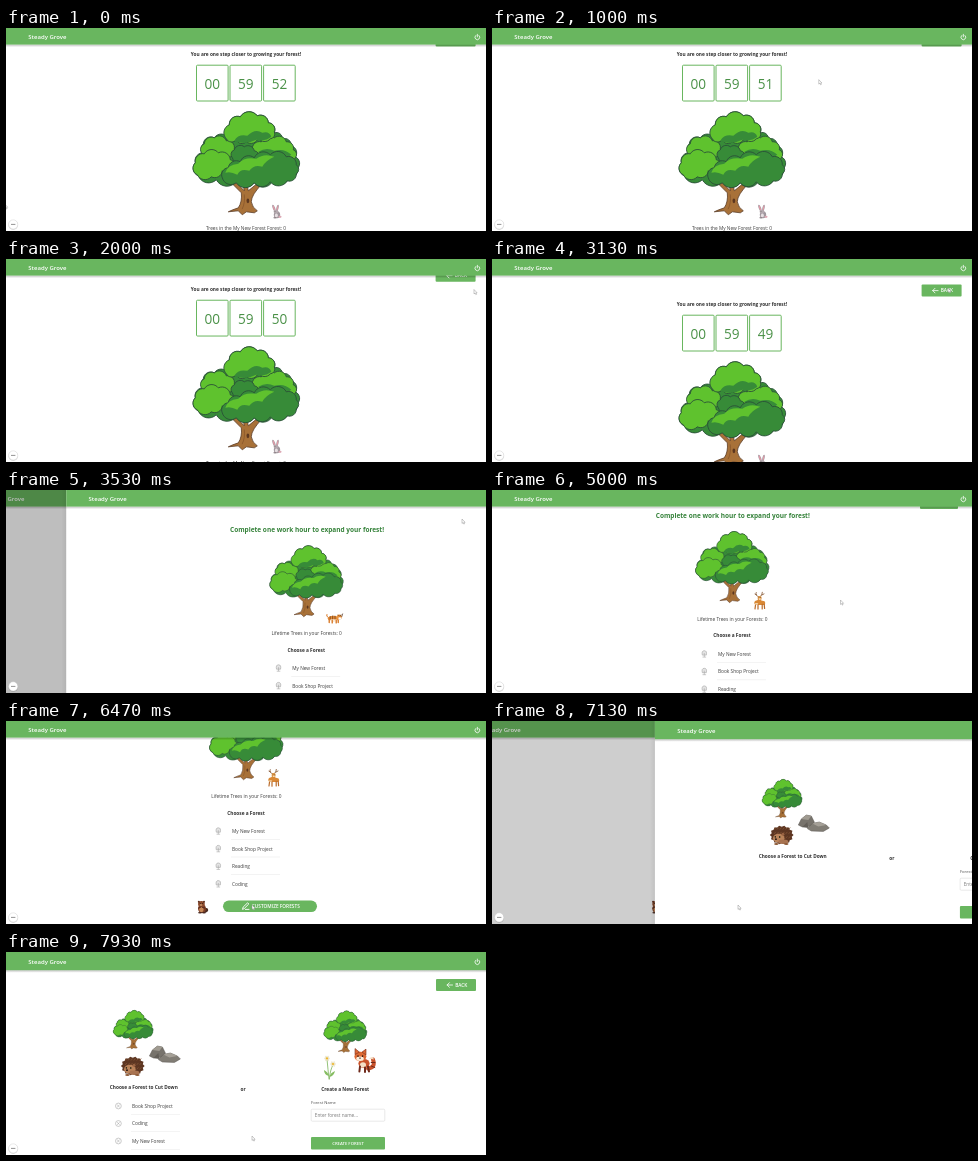
An HTML page that plays this animation: 480x203 px, repeating every 8 s.

```html
<!DOCTYPE html>
<html lang="en">
<head>
<meta charset="utf-8">
<title>Steady Grove</title>
<style>
  html, body { margin: 0; width: 100%; height: 100%; overflow: hidden; background: #fff; }
  svg { display: block; width: 100vw; height: 100vh; }
  text { font-family: "Open Sans", "Noto Sans", sans-serif; font-size: 4.78px; fill: #3c3c3c; }
  .b { font-weight: 700; fill: #303030; }
  .w { font-weight: 600; fill: #fff; }
  .m { text-anchor: middle; }
</style>
</head>
<body>
<svg id="stage" viewBox="0 0 480 203" preserveAspectRatio="none"></svg>
<script>
const GREEN = '#69b65f', INK = '#2b5138', LIGHT = '#5fc22e', DARK = '#378b38';
const APP = 'Steady Grove';

// ---- drawing helpers ----
const text = (x, y, s, cls = '', extra = '') => `<text x="${x}" y="${y}" class="${cls}" ${extra}>${s}</text>`;
const rect = (x, y, w, h, fill, extra = '') => `<rect x="${x}" y="${y}" width="${w}" height="${h}" fill="${fill}" ${extra}/>`;
const path = (d, fill = 'none', extra = '') => `<path d="${d}" fill="${fill}" ${extra}/>`;
const oval = (x, y, rx, ry, fill, extra = '') => `<ellipse cx="${x}" cy="${y}" rx="${rx}" ry="${ry}" fill="${fill}" ${extra}/>`;
const line = (d, color, width) => path(d, 'none', `stroke="${color}" stroke-width="${width}" stroke-linecap="round" stroke-linejoin="round"`);
const at = (x, y, scale, body) => `<g transform="translate(${x} ${y}) scale(${scale})">${body}</g>`;

// Closed outline of outward bumps through the given points (clockwise).
function cloud(fill, ...pts) {
  let d = `M${pts[0]}`;
  pts.forEach((p, i) => {
    const q = pts[(i + 1) % pts.length];
    const r = Math.hypot(q[0] - p[0], q[1] - p[1]) * 0.6;
    d += `A${r} ${r} 0 0 1 ${q}`;
  });
  return path(d + 'Z', fill, `stroke="${INK}" stroke-width="0.9" stroke-linejoin="round"`);
}

const tree =
  path('M36 69L49 82Q50 91 46 97Q40 99 36 101L46 100L50 104L54 101L62 102L65 100Q60 97 59 91Q59 84 70 73L67 71L56 80L54 70L50 70L52 80L40 68Z',
    '#a87138', 'stroke="#5b3d28" stroke-width="0.8" stroke-linejoin="round"') +
  oval(55.6, 90, 1.4, 2.4, '#5d371f') +
  line('M52 84Q53 92 50 98', '#855229', 0.7) +
  cloud(DARK, [6, 65], [3, 52], [12, 42], [11, 33], [22, 27], [36, 27], [37, 14], [48, 6], [65, 5], [76, 12],
    [82, 22], [90, 28], [99, 35], [103, 46], [105, 58], [97, 67], [80, 71], [62, 72], [44, 71], [24, 69]) +
  cloud(LIGHT, [60, 39], [69, 31], [82, 27], [94, 31], [101, 39], [103, 47], [90, 49], [76, 45]) +
  path('M66 41Q74 36 82 40Q92 37 99 44Q92 50 84 46Q74 48 66 41Z', DARK) +
  cloud(LIGHT, [10, 43], [12, 33], [22, 27], [34, 30], [42, 38], [38, 46], [24, 47]) +
  cloud(DARK, [40, 47], [42, 39], [52, 36], [62, 40], [66, 47], [54, 51]) +
  cloud(LIGHT, [34, 28], [37, 14], [48, 6], [65, 5], [76, 12], [82, 21], [78, 28], [66, 27], [54, 31], [44, 29]) +
  path('M42 30Q46 23 55 25Q63 17 70 22Q77 20 79 26Q73 31 64 29Q52 35 42 30Z', DARK) +
  cloud(LIGHT, [5, 64], [3, 52], [12, 43], [26, 42], [38, 49], [42, 59], [30, 60], [19, 66]) +
  cloud(DARK, [30, 67], [36, 57], [48, 51], [62, 47], [78, 44], [94, 46], [104, 54], [104, 63], [95, 70], [78, 71], [62, 72], [44, 72]) +
  path('M33 62Q35 54 46 53Q52 46 64 48Q72 42 82 46Q73 50 70 56Q62 53 57 60Q48 57 45 64Q38 60 33 62Z', LIGHT);

const rabbit =
  oval(3, 3.8, 1.2, 3.7, '#a89ba2', 'transform="rotate(-20 3 4)"') +
  oval(3, 3.8, 0.6, 2.8, '#e79aa8', 'transform="rotate(-20 3 4)"') +
  oval(6.4, 3.6, 1.1, 3.5, '#a89ba2', 'transform="rotate(12 6 4)"') +
  oval(6.4, 3.6, 0.5, 2.7, '#e79aa8', 'transform="rotate(12 6 4)"') +
  oval(6, 10.4, 3.2, 3.5, '#a0979d') + oval(5, 7.4, 2.4, 2, '#b3a8ae') +
  oval(5.4, 11, 1.5, 2, '#e6dfe2') + oval(9, 12.4, 1.6, 1.1, '#dca9b5') +
  oval(4, 13.3, 1.7, 0.8, '#8d8288') + oval(4, 7, 0.4, 0.4, '#443');

const tiger =
  oval(7, 5, 5.5, 2.8, '#e58a34') + oval(13, 3.6, 2.6, 2.5, '#ea9440') +
  oval(13.6, 4.8, 1.5, 1.1, '#fff') + oval(7, 6.7, 4, 1, '#fbead7') +
  line('M3 6V9M6 7V9.4M10 7V9.4M12 6.6V9', '#d97b2a', 1.4) +
  line('M4 3V5.6M6.4 2.5V5.4M8.8 2.6V5.4M12 1.4L13 2.4M14.8 1.3L14 2.5', '#4b2d1a', 0.6) +
  line('M2 4Q-.4 3 .6 1', '#d97b2a', 1) + line('M15.6 3L16.4 .4', '#4b2d1a', 0.7);

const deer =
  line('M8 5Q3 4 4.6 .6M8 5Q11 4 10.8 .4M5 3L3.4 2.2M10.4 3L12.4 2', '#80502b', 0.8) +
  path('M6.4 4.6L9.6 4.6L9.6 8.6L13 9.4Q14.4 11 13 13L4.2 13Q1.6 11.4 3.4 9L6.2 8Z', '#d98835') +
  oval(8, 6, 2, 1.9, '#e19a4a') + oval(8.2, 7.2, 1, 0.8, '#f8e3c4') +
  line('M4 12.5L3.4 17M6.4 12.5V17.2M10.6 12.5V17M12.6 12.5L13 16.6', '#b96a28', 1.2) +
  oval(5, 12, 1.8, 0.8, '#f4d9b2') + oval(7.4, 5.8, 0.35, 0.35, '#321') + oval(9, 5.8, 0.35, 0.35, '#321');

const beaver =
  oval(9.5, 10.6, 2.6, 2, '#4d2d22', 'transform="rotate(-25 9 10)"') +
  oval(6, 8.6, 4, 4.3, '#7d3f26') + oval(5.4, 4, 3.4, 3, '#8c4a2c') +
  oval(2.8, 1.8, 1, 1, '#5f2f1f') + oval(8, 1.8, 1, 1, '#5f2f1f') +
  oval(5.4, 9.6, 2.2, 2.6, '#c98a58') + oval(5, 5, 1.3, 0.8, '#d8a878') +
  line('M2.6 8L5 7M9 8L6.4 7.4', '#5a2d1f', 1) +
  oval(4, 12.8, 2, 0.8, '#432219') + oval(8, 12.8, 2, 0.8, '#432219') +
  oval(4.2, 3.4, 0.4, 0.5, '#111') + oval(6.6, 3.4, 0.4, 0.5, '#111');

const spikes = Array.from({ length: 28 }, (_, i) => {
  const a = i / 28 * 2 * Math.PI, k = i % 2 ? 0.9 : 1.04;
  return [12.4 + 11.4 * k * Math.cos(a), 9.8 + 9.2 * k * Math.sin(a)].map(v => v.toFixed(1));
}).join('L');
const quills = Array.from({ length: 18 }, (_, i) => {
  const x = 5 + (i % 6) * 2.9, y = 4 + Math.floor(i / 6) * 4.4;
  return `M${x} ${y}l1.2 -1.4`;
}).join('');
const hedgehog =
  path(`M${spikes}Z`, '#5d3622') + line(quills, '#8a5a3a', 0.7) +
  oval(9.4, 13, 5.8, 4.4, '#b98259') + oval(14, 16.6, 5, 2.2, '#a87350') +
  oval(6.6, 14, 1, 0.9, '#2b1a14') + oval(6, 11.6, 0.7, 0.9, '#221') + oval(10.4, 11.8, 0.7, 0.9, '#221') +
  oval(13.6, 9, 1.5, 1.5, '#9a6443') + oval(7, 18.8, 2.2, 1.1, '#8d5a37') + oval(17, 18.8, 2.2, 1.1, '#8d5a37');

const rocks =
  path('M0 11L3 5L8 1L13 2L16 8L15 12L4 13Z', '#77736c', 'stroke="#5b5752" stroke-width=".5"') +
  path('M3 5L8 1L13 2L10 6Z', '#a09b91') +
  path('M9 14.6L14 9.4L21 8L28 11L31 14L25 17.4L13 17Z', '#817d75', 'stroke="#5b5752" stroke-width=".5"') +
  path('M14 9.4L21 8L28 11L20 12.4Z', '#a5a097') + path('M4 13L9 8L10 14Z', '#625e58');

const fox =
  line('M15 20Q23 19 20 11', '#c9522b', 4) + line('M18.4 17.6L21.8 19M18.2 14L22 14', '#6f2a1c', 1) +
  path('M16 10Q20 7 21 11Z', '#f2dcc0') +
  oval(11, 15, 5.6, 4.6, '#c9522b') + oval(7.4, 8, 6, 4.8, '#dc6a35') +
  path('M2 6L2 0L6.4 3.6ZM9 3.6L13 .6L13 6.4Z', '#dc6a35', 'stroke="#7c2f1d" stroke-width=".6"') +
  oval(7, 10.2, 3.8, 2.2, '#fbeddc') + oval(5, 7.6, 0.7, 0.9, '#22140f') + oval(9.6, 7.6, 0.7, 0.9, '#22140f') +
  oval(7, 9.6, 0.8, 0.6, '#22140f') + oval(10, 16.4, 3, 2.6, '#f4dfc6') +
  line('M7 18L6.4 23M12 19V23.6M15 18L16 23', '#6f2a1c', 2);

const daisy = (x, y) =>
  [0, 60, 120].map(a => oval(x, y, 2.8, 0.9, '#f3eed6', `stroke="#d6cfa8" stroke-width=".25" transform="rotate(${a} ${x} ${y})"`)).join('') +
  oval(x, y, 1.1, 1.1, '#efb52c');
const flowers =
  line('M5 24Q4 15 3 4M5.4 24Q6 15 9 10', '#79b358', 0.8) +
  path('M5 21Q0 20 0 15Q4 17 5 21ZM5.4 22Q10 21 11 16Q6 18 5.4 22Z', '#86bd62') +
  daisy(3, 3.4) + daisy(9, 9);

// ---- interface parts ----
const power = y => line(`M469.7 ${y - 1.6}A2.4 2.4 0 1 0 473 ${y - 1.6}M471.35 ${y - 2.8}V${y - 0.2}`, '#fff', 0.8);
const header = h =>
  rect(0, h, 480, 2.6, 'url(#under)') + rect(0, 0, 480, h, GREEN) +
  text(22.3, h / 2 + 2.7, APP, 'w', 'style="font-size:6px"') + power(h / 2 + 0.8);
const back = (x, y, w) =>
  rect(x, y, w, 12, GREEN, 'rx="1"') +
  line(`M${x + 16.5} ${y + 6}h-5.4m2.3 -2.3l-2.3 2.3l2.3 2.3`, '#fff', 0.8) +
  text(x + 19.2, y + 7.8, 'BACK', 'w');

const page = (id, h, body) =>
  `<g id="${id}">${rect(-5, 0, 5, 203, 'url(#edge)')}${rect(0, 0, 480, 203, '#fff')}` +
  `<g class="body">${body}</g>${header(h)}${rect(0, 0, 490, 203, '#000', 'class="dim" opacity="0"')}</g>`;

const clockBox = (x, s, id) =>
  rect(x, 56.2, 31.6, 35.8, '#fff', `stroke="${GREEN}" stroke-width="1" rx="1"`) +
  text(x + 15.8, 80, s, 'm', `id="${id}" style="font-size:13.6px;fill:#4a9147"`);

const timerPage = page('timer', 16.6,
  back(429.6, 25.6, 40) +
  text(240, 46.8, 'You are one step closer to growing your forest!', 'b m') +
  clockBox(190.5, '00', 'hr') + clockBox(224, '59', 'min') + clockBox(257.6, '52', 'sec') +
  at(186.3, 101.8, 1, tree) + at(265, 195.4, 1, rabbit) +
  text(240, 221.4, 'Trees in the My New Forest Forest: 0', 'm'));

const treeIcon = (x, y) =>
  path(`M${x - 2} ${y + 1}Q${x - 3} ${y - 3.4} ${x} ${y - 3.4}Q${x + 3} ${y - 3.4} ${x + 2} ${y + 1}ZM${x} ${y - 1}V${y + 3}M${x - 1.8} ${y + 3}h3.6`,
    '#e4e4e4', 'stroke="#a4a4a4" stroke-width=".6"');
const choices = ['My New Forest', 'Book Shop Project', 'Reading', 'Coding'].map((name, i) => {
  const y = 178.2 + i * 17.6;
  return treeIcon(212.3, y) + text(226, y + 1.7, name) + (i < 3 ? rect(225, y + 8, 49, 0.4, '#e2e2e2') : '');
}).join('');

const homePage = page('home', 16.6,
  back(428, 21, 38) +
  text(240.8, 42.3, 'Complete one work hour to expand your forest!', 'b m', 'style="font-size:6.5px;fill:#35823a"') +
  at(203, 55, 0.69, tree) +
  `<g id="tiger">${at(260, 123.5, 1, tiger)}</g><g id="deer">${at(259.6, 116, 1, deer)}</g>` +
  text(240.4, 144.8, 'Lifetime Trees in your Forests: 0', 'm') +
  text(240, 161.6, 'Choose a Forest', 'b m') + choices +
  at(190, 247, 1, beaver) +
  rect(217, 247.5, 94, 11.6, GREEN, 'rx="5.8"') +
  line('M236.6 256L237.2 254L241.6 249.8L242.8 251L238.4 255.4ZM239.4 256.4H243', '#fff', 0.9) +
  text(245.8, 255, 'CUSTOMIZE FORESTS', 'w'));

const cuts = ['Book Shop Project', 'Coding', 'My New Forest'].map((name, i) => {
  const y = 154 + i * 17.5;
  return oval(112.4, y, 2.9, 2.9, 'none', 'stroke="#999" stroke-width=".5"') +
    line(`M111.4 ${y - 1}l2 2m0 -2l-2 2`, '#999', 0.5) +
    text(126, y + 1.8, name) + rect(125, y + 8, 49, 0.4, '#e2e2e2');
}).join('');

const editPage = page('edit', 18.2,
  back(430, 27, 40) +
  at(107, 58, 0.375, tree) + at(114.4, 104.2, 1, hedgehog) + at(143.4, 93, 1, rocks) +
  text(137.8, 136.6, 'Choose a Forest to Cut Down', 'b m') +
  `<g id="cuts">${cuts}</g>` +
  text(237, 139, 'or', 'b m') +
  at(317.5, 58.5, 0.405, tree) + at(318, 103, 1, flowers) + at(347, 96.5, 1, fox) +
  text(339.2, 139, 'Create a New Forest', 'b m') +
  text(305, 152.4, 'Forest Name', '', 'style="font-size:4.2px;fill:#555"') +
  rect(305.2, 157.2, 73.6, 12, '#fff', 'stroke="#d2d2d2" stroke-width=".5" rx="1"') +
  text(308.8, 165, 'Enter forest name...', '', 'style="font-size:4.7px;fill:#777"') +
  rect(305, 185, 74, 12.4, GREEN, 'rx="1"') +
  text(342, 192.7, 'CREATE FOREST', 'w m', 'style="font-size:4.25px"'));

const badge =
  oval(7.2, 197, 4.9, 4.9, '#000', 'opacity=".14"') +
  oval(7.2, 196.4, 4.6, 4.6, '#fff', 'stroke="#ccc" stroke-width=".4"') +
  line('M5.4 196.4H9', '#777', 0.8);
const cursor = `<g id="cursor">${path('M0 0V4.4L1.1 3.6L1.8 5.1L2.5 4.8L1.9 3.3H3.1Z', '#fff', 'stroke="#8a8a8a" stroke-width=".45"')}</g>`;

const $ = id => document.getElementById(id);
$('stage').innerHTML = `<defs>
  <linearGradient id="under" x2="0" y2="1"><stop stop-color="#000" stop-opacity=".24"/><stop offset="1" stop-color="#000" stop-opacity="0"/></linearGradient>
  <linearGradient id="edge"><stop stop-color="#000" stop-opacity="0"/><stop offset="1" stop-color="#000" stop-opacity=".06"/></linearGradient>
</defs>` + timerPage + homePage + editPage + badge + cursor;

// ---- motion ----
const LOOP = 8000, SLIDE = 400, TO_HOME = 3333, TO_EDIT = 7026;
const clamp = v => Math.min(1, Math.max(0, v));

// cubic-bezier(.3, .4, 0, .9)
function slideEase(p) {
  if (p <= 0 || p >= 1) return clamp(p);
  const curve = (s, a, b) => 3 * (1 - s) ** 2 * s * a + 3 * (1 - s) * s * s * b + s ** 3;
  let lo = 0, hi = 1;
  for (let i = 0; i < 24; i++) {
    const mid = (lo + hi) / 2;
    if (curve(mid, 0.3, 0) < p) lo = mid; else hi = mid;
  }
  return curve(hi, 0.4, 0.9);
}

// Linear interpolation over [time, ...values] keys.
function track(keys, t) {
  const i = keys.findIndex(k => k[0] > t);
  if (i === 0) return keys[0].slice(1);
  if (i < 0) return keys[keys.length - 1].slice(1);
  const a = keys[i - 1], b = keys[i], p = (t - a[0]) / (b[0] - a[0]);
  return a.slice(1).map((v, j) => v + (b[j + 1] - v) * p);
}

const pointer = [[0, -1.5, 176], [250, 30, 168], [870, 272, 62], [1200, 410, 36], [1500, 468, 30.5], [2600, 468, 30.5],
  [2800, 456, 29], [4200, 456, 29], [4850, 348.5, 110], [5500, 348.5, 110], [5870, 300, 148], [6300, 246, 184], [8000, 246, 184]];
const timerScroll = [[1800, 19], [2000, 15], [2350, 4], [2560, 0]];
const homeScroll = [[4860, 0], [5000, 14], [5350, 50], [5550, 64], [5700, 68]];

function place(id, enter, leave, scroll) {
  const g = $(id), x = (1 - enter) * 480 - leave * 48;
  g.style.display = enter > 0 && leave < 1 ? '' : 'none';
  g.setAttribute('transform', `translate(${x} 0)`);
  g.querySelector('.body').setAttribute('transform', `translate(0 ${-scroll})`);
  g.querySelector('.dim').setAttribute('opacity', leave * 0.29);
}

function draw(t) {
  const home = slideEase((t - TO_HOME) / SLIDE);
  const edit = slideEase((t - TO_EDIT) / SLIDE);
  place('timer', 1, home, track(timerScroll, t)[0]);
  place('home', home, edit, track(homeScroll, t)[0]);
  place('edit', edit, 0, 0);
  $('sec').textContent = 52 - Math.floor((t + 130) / 1000);
  $('tiger').style.display = t < 3800 ? '' : 'none';
  $('deer').style.display = t < 3800 ? 'none' : '';
  $('cuts').style.display = t < 7450 ? 'none' : '';
  $('cursor').setAttribute('transform', `translate(${track(pointer, t)})`);
}

const start = performance.now();
function tick() {
  draw((performance.now() - start) % LOOP);
  requestAnimationFrame(tick);
}
draw(0);
requestAnimationFrame(tick);
</script>
</body>
</html>
```
